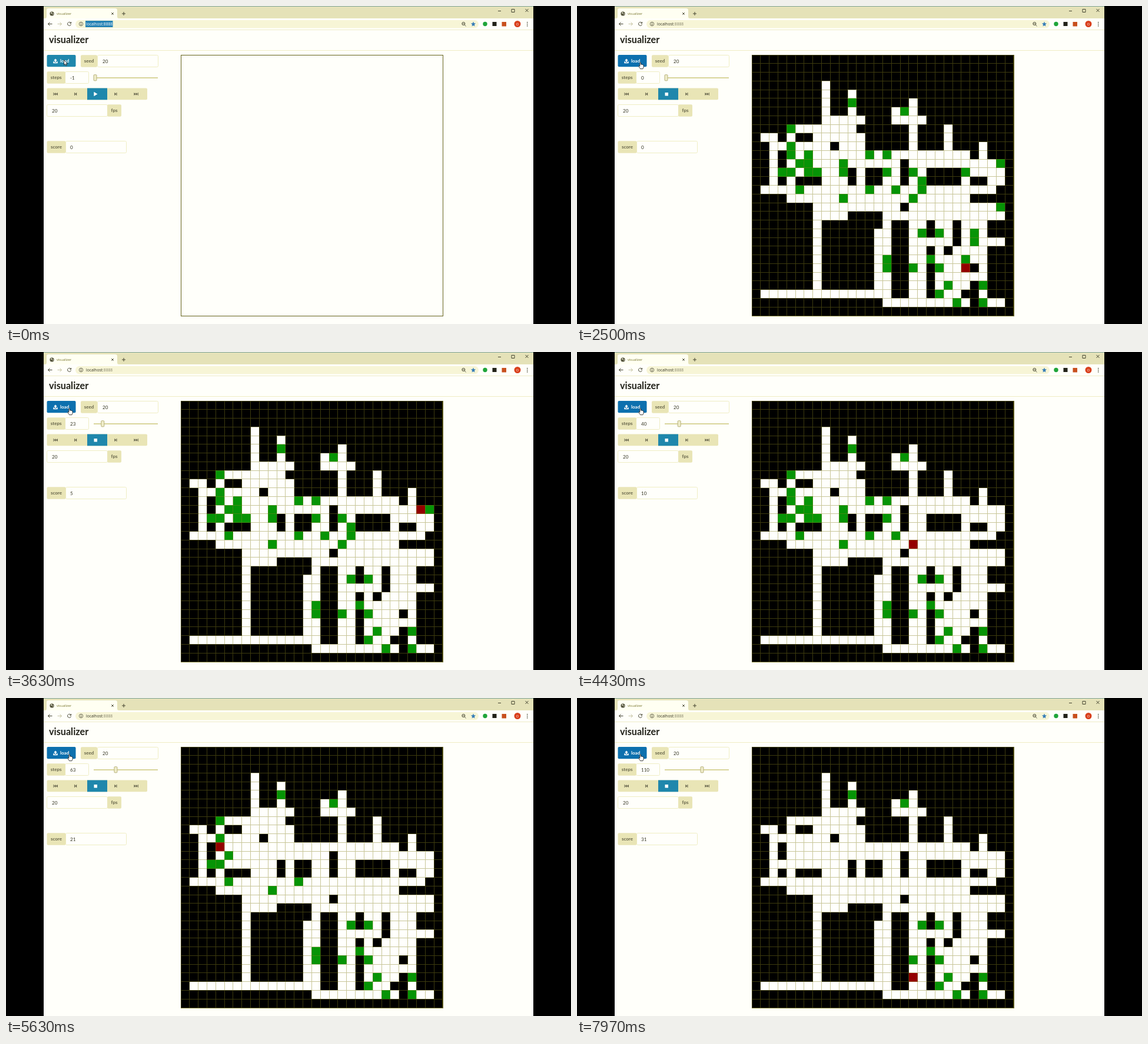
Animation, 960 px wide and 540 px high, one loop 8000 ms. Source, as an HTML page:

```html
<!DOCTYPE html>
<html lang="en">
<head>
<meta charset="utf-8">
<title>visualizer</title>
<style>
  html, body { margin: 0; width: 100%; height: 100%; overflow: hidden; background: #000; }
  svg { display: block; width: 960px; height: 540px; }
  text { font: 8px Lato, sans-serif; fill: #333322; }
  .tag text, .bold { font-weight: 700; }
  .tag text { fill: #66644a; text-anchor: middle; }
  .tag rect, .keys { fill: #e9e5b6; }
  .box { fill: #fffffb; stroke: #efedc4; }
  .chrome text { font: 6.7px "Open Sans", "Noto Sans", sans-serif; }
  .line { fill: none; stroke: #444430; }
  .blue { fill: #1f87ac; }
  .icon { fill: #6b6950; }
  .crisp { shape-rendering: crispEdges; }
  .cursor path { fill: #fff; stroke: #111; stroke-width: .8; stroke-linejoin: round; }
</style>
</head>
<body>
<svg viewBox="0 0 960 540">
  <defs>
    <path id="skip" d="M-3.8-2.5h1v5h-1zM-2.8 0l3.2-2.6v5.2zM.4 0l3.2-2.6v5.2z"/>
    <path id="step" d="M-2-2.6h1.1v5.2h-1.1zM-.9 0l3.1-2.7v5.4z"/>
  </defs>
  <rect x="64" width="832" height="540" fill="#fffffa"/>

  <g class="chrome">
    <rect x="64" width="832" height="21" fill="#e5e2b8"/>
    <rect x="64" width="832" height="1" fill="#7fa39a"/>
    <path d="M66 21q3 0 3-3V7q0-3 3-3h113q4 0 4 3v11q0 3 3 3z" fill="#fffff2"/>
    <circle cx="78" cy="13" r="3.6" fill="#55553f"/>
    <path d="M76 11.2l2-.8.6 1.6-1.6 1.6zM79 13l1.8-.4-.8 2.4z" fill="#eeeed8"/>
    <text x="86" y="15.3" style="font-size:5.8px;fill:#77742c">visualizer</text>
    <path class="line" d="M179.2 11.2l3.6 3.6m0-3.6l-3.6 3.6M197 13h6m-3-3v6M836 8.5h5M859 5.500h5v5h-5zM882.500 5l5 5m0-5l-5 5"/>
    <path d="M64 40.500H896" stroke="#eeecc8"/>
    <rect x="118" y="24" width="685" height="13.500" rx="6.700" fill="#f7f5d6"/>
    <path class="line" d="M78.500 30.500h-7m3-3l-3 3 3 3M110 28.600a3 3 0 1 0 .5 2.500m.2-4v2.200h-2.400"/>
    <path class="line" d="M87.500 30.500h7m-3-3l3 3-3 3" style="stroke:#c6c4a2"/>
    <circle class="line" cx="127.500" cy="30.500" r="3.200" stroke-width=".8"/>
    <path class="line" d="M127.500 28.500v1m0 .7v2.300"/>
    <rect id="mark" x="135" y="25" width="46.500" height="11" fill="#2683b5"/>
    <text x="136" y="33"><tspan id="host">localhost</tspan><tspan id="port">:8888</tspan></text>
    <circle class="line" cx="777.300" cy="30" r="2.500"/>
    <path class="line" d="M779.200 32l2.300 2.300M776 30h2.600" stroke-width=".9"/>
    <path d="M794 26.500l1.200 2.700 2.900.3-2.200 2 .6 2.900-2.500-1.500-2.500 1.500.6-2.900-2.200-2 2.900-.3z" fill="#397fb8"/>
    <circle cx="814" cy="30.500" r="3.700" fill="#20a53a"/>
    <rect x="826.500" y="27" width="7" height="7" fill="#222218"/>
    <rect x="842.500" y="27" width="7.500" height="7.500" fill="#c8501e"/>
    <circle cx="869" cy="30.500" r="5.500" fill="#d9401c"/>
    <text x="869" y="32.600" text-anchor="middle" style="font-size:5.500px;fill:#fff">O</text>
    <path d="M885 27h1.400v1.400h-1.400zm0 3h1.400v1.400h-1.400zm0 3h1.400v1.400h-1.400z" fill="#444430"/>
  </g>

  <text class="bold" x="73" y="63.300" style="font-size:16.200px;fill:#22221a">visualizer</text>
  <path d="M64 75.500H896" stroke="#efedc4"/>

  <rect id="load" x="69.500" y="83" width="49" height="20.300" rx="2"/>
  <path d="M84 89.500l3 3.200h-2v2.500h-2v-2.500h-2zM80.300 94.200h2v1.800h3.400v-1.800h2v3h-7.400z" fill="#fff"/>
  <text class="bold" x="92" y="96.200" style="fill:#fff">load</text>

  <g id="fields"></g>
  <text id="steps" x="109" y="124.700"></text>
  <text id="score" x="109" y="242.500"></text>

  <path d="M149 122H258" stroke="#d9d59c" stroke-width="1.800"/>
  <rect id="thumb" y="116.800" width="5" height="10" rx="1" fill="#f0edca" stroke="#b5b07a"/>

  <rect class="keys" x="69.500" y="139.500" width="170.500" height="19.800" rx="2"/>
  <rect class="blue" x="138" y="139.500" width="34" height="19.800"/>
  <g class="icon">
    <use href="#skip" x="84.300" y="149.500"/>
    <use href="#step" x="118" y="149.500"/>
    <use href="#step" transform="translate(186.500 149.500) scale(-1 1)"/>
    <use href="#skip" transform="translate(221 149.500) scale(-1 1)"/>
  </g>
  <path id="play" fill="#fff"/>

  <rect class="crisp" x="297.500" y="83.500" width="445" height="443" fill="none" stroke="#65631c"/>
  <g id="board" class="crisp" transform="translate(297 83) scale(14.8333 14.7667)">
    <rect width="30" height="30"/>
    <path id="floor" fill="#fffffc"/>
    <path id="food" fill="#069406"/>
    <path id="player" fill="#940000"/>
    <path id="grid" fill="none" stroke="#858020" stroke-opacity=".45" vector-effect="non-scaling-stroke"/>
  </g>

  <g class="cursor">
    <path id="arrow" d="M98.500 91.800v8.400l2-1.800 1.300 3 1.400-.6-1.300-2.900h2.700z"/>
    <path id="hand" d="M106.800 96q1-.9 1.700.2v3l1.200-.2.900.5 1.100 0 .6.700 .8.300v3.200l-1.200 3h-4.300l-2.900-4.500q.6-1.400 2.100.2z"/>
  </g>
</svg>
<script>
const LOOP = 8000, POINT = 1470, CLICK = 2300;
const SIZE = 30;
// '#' wall, '.' floor, 'o' food, 'S' start; missing cells are wall
const rows = [
  '', '', '',
  '########.',
  '########.##.',
  '########.##o######.',
  '########.##.####.o.',
  '########.....###....',
  '####o.......######.###.',
  '#..#.##......#####.###.',
  '##..o....#...#####.###.###.',
  '##.#o.o......o.o.........#.',
  '##.#.oo...o......#..........o',
  '##.oo.oo..o#.##o.#o.####o....',
  '##.#.###...#.##..#.o####.##..',
  '#....o.......o..o..o........',
  '####......o.......o......',
  '#######..........#..........o',
  '#######....####..............',
  '#######.#######.##..#..#...',
  '#######.######..##.o#o.#.o.',
  '#######.######..##.....#.o...',
  '#######.######..##..#.#....',
  '#######.######.o##..o...o..',
  '#######.######.o##o.#o..S#.',
  '#######.######..##..#......',
  '#######.######..##..#.o..#o',
  '#...............##..#o..##.',
  '###############........o.#o..',
  ''
];
const cells = rows.map(r => r.padEnd(SIZE, '#')).join('');
const $ = id => document.getElementById(id);
const show = (id, on) => $(id).style.display = on ? '' : 'none';
const indices = test => [...cells].flatMap((c, i) => test(c) ? [i] : []);
const squares = list =>
  list.map(i => `M${i % SIZE} ${Math.floor(i / SIZE)}h1v1h-1z`).join('');

// Breadth-first walk to the nearest food, trying up, left, down, right
function route(from, food) {
  const prev = new Map([[from, null]]), queue = [from];
  for (const at of queue) {
    if (food.has(at)) {
      const path = [];
      for (let p = at; p !== from; p = prev.get(p)) path.unshift(p);
      return path;
    }
    for (const d of [-SIZE, -1, SIZE, 1]) {
      const next = at + d;
      if (cells[next] !== '#' && !prev.has(next)) {
        prev.set(next, at);
        queue.push(next);
      }
    }
  }
  return [];
}

const foods = indices(c => c === 'o');
const track = [cells.indexOf('S')], eaten = new Map();
for (const left = new Set(foods); left.size;) {
  track.push(...route(track.at(-1), left));
  left.delete(track.at(-1));
  eaten.set(track.at(-1), track.length - 1);
}

function field(name, tagX, tagW, boxX, boxW, y, value = '') {
  return `<rect class="box" x="${boxX}" y="${y}" width="${boxW}" height="20" rx="2"/>
    <g class="tag"><rect x="${tagX}" y="${y - .3}" width="${tagW}" height="20.6" rx="2"/>
    <text x="${tagX + tagW / 2}" y="${y + 12.4}">${name}</text></g>
    <text x="${boxX + 8.5}" y="${y + 13}">${value}</text>`;
}
$('fields').innerHTML =
  field('seed', 127, 28, 155.5, 103, 83.5, 20) +
  field('steps', 69.5, 31.5, 100.5, 40, 111.5) +
  field('fps', 172, 24, 69.5, 103, 167.5, 20) +
  field('score', 69.5, 32, 101.5, 103, 229.5);

$('floor').setAttribute('d', squares(indices(c => c !== '#')));
$('grid').setAttribute('d',
  Array.from({ length: SIZE + 1 }, (_, i) => `M${i} 0V${SIZE}M0 ${i}H${SIZE}`).join(''));

function stepAt(t) {
  if (t < CLICK) return -1;
  const s = t < 4425 ? (t - 2460) / 49.1 : 40 + (t - 4425) / 50.36;
  return Math.max(0, Math.floor(s));
}

function draw(t) {
  const loaded = t >= CLICK, step = stepAt(t);
  const left = foods.filter(f => eaten.get(f) > step);
  show('mark', !loaded);
  show('board', loaded);
  show('arrow', t < POINT);
  show('hand', t >= POINT);
  $('host').style.fill = loaded ? '#333322' : '#fff';
  $('port').style.fill = loaded ? '#85836a' : '#fff';
  $('load').style.fill = loaded ? '#0d70ae' : '#1f87ac';
  $('play').setAttribute('d', loaded ? 'M149.5 147h5.500v5.500h-5.500z' : 'M149.300 145.800l6.200 3.700-6.200 3.700z');
  $('steps').textContent = step;
  $('score').textContent = foods.length - left.length;
  $('thumb').setAttribute('x', 149 + .5545 * Math.max(0, step));
  $('food').setAttribute('d', squares(left));
  $('player').setAttribute('d', squares([track[Math.max(0, step)]]));
}

const start = performance.now();
(function tick() {
  draw((performance.now() - start) % LOOP);
  requestAnimationFrame(tick);
})();
</script>
</body>
</html>
```
